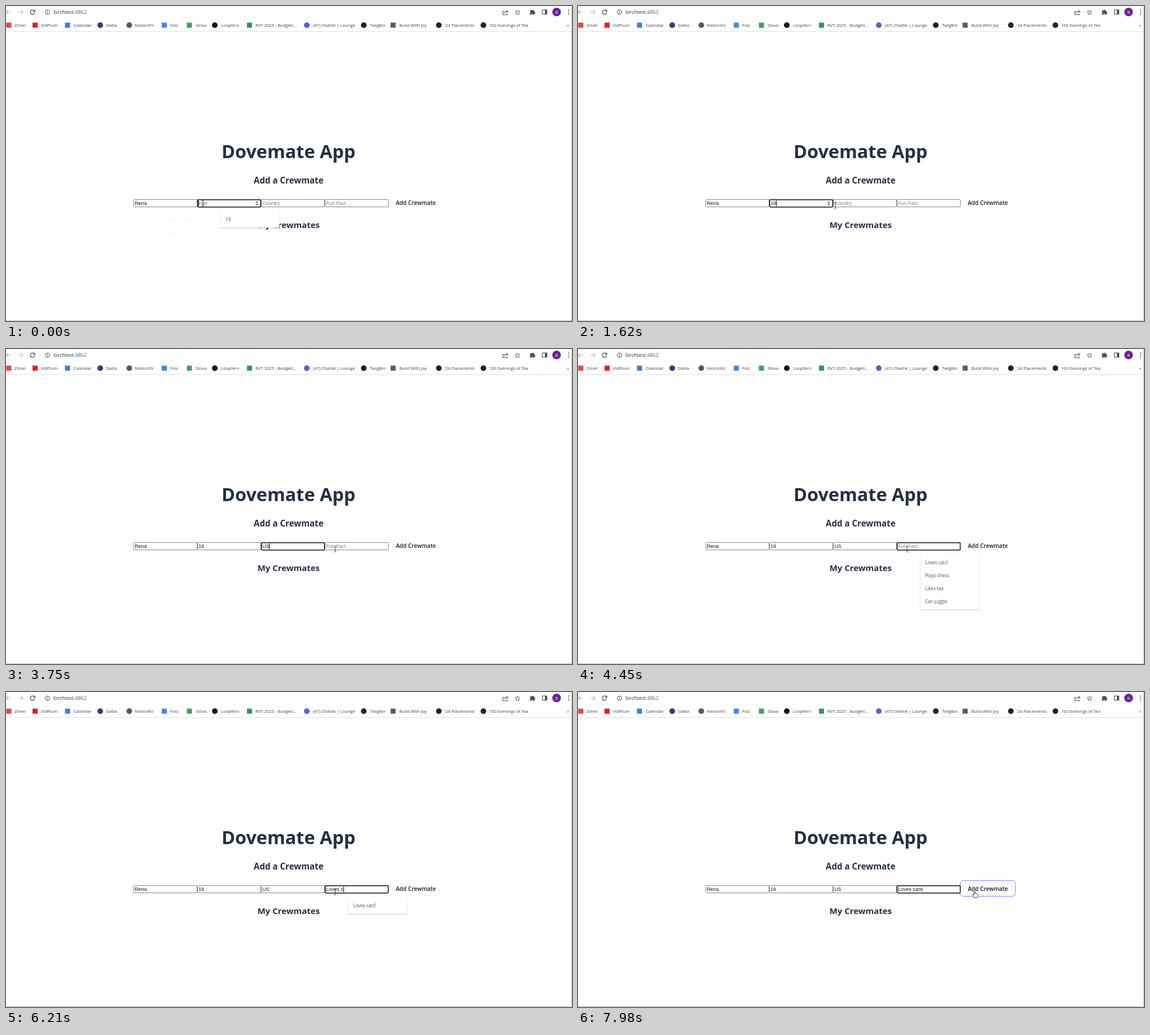
Animation of 1003 by 559 pixels, one loop 8000 ms. Source, as an HTML page:

```html
<!DOCTYPE html>
<html lang="en">
<head>
<meta charset="utf-8">
<title>Crew form</title>
<style>
html, body { margin: 0; width: 100%; height: 100%; overflow: hidden; background: #fff; }
svg { display: block; font-family: "Open Sans", "Noto Sans", sans-serif; }
text { white-space: pre; }
.bar { font-size: 7.6px; fill: #3f4246; }
.head { font-weight: 700; text-anchor: middle; fill: #242f42; }
.field { font: 8.89px "Liberation Sans", Arial, sans-serif; }
.line { fill: none; stroke: #4c4f53; stroke-width: 1.1; }
#menu rect { fill: #fff; filter: drop-shadow(0 1.2px .8px rgba(0, 0, 0, .22)); }
#menu text { font-size: 8.1px; fill: #505050; }
#button rect { fill: #fafafc; stroke: #8f8cff; filter: drop-shadow(0 1px 2px rgba(100, 108, 255, .12)); }
#ghost { font-size: 7.7px; fill: #f5f5f5; }
</style>
</head>
<body>
<svg id="stage" width="1003" height="559" viewBox="0 0 1003 559">
  <!-- address bar -->
  <g class="line">
    <path d="M9 11H0M4.5 7L.5 11l4 4M21 11h9M26 7l4 4-4 4" stroke="#b9bcc0"/>
    <path d="M50.3 8.3A4 4 0 1 0 51 12M51 6.5V9.6H47.8" stroke-width="1.3"/>
    <circle cx="73.5" cy="11" r="3.8"/>
    <path d="M73.5 10.5v2.7M73.5 8.6v1"/>
    <path d="M883 9.5H880.5V15.5H888.5V13.5M883 13C883.5 10.5 885 9.5 887 9.5M886.5 7.3L889.5 9.7L886.5 12"/>
    <path d="M906.5 7l1.25 2.8 3 .3-2.3 2 .7 3-2.65-1.6-2.65 1.6.7-3-2.3-2 3-.3z" stroke-width=".9"/>
    <rect x="950.5" y="7" width="8" height="7.5"/>
  </g>
  <g fill="#4c4f53">
    <path d="M928.5 8h2.5a1.5 1.5 0 0 1 3 0h2.5v2.5a1.5 1.5 0 0 1 0 3V15.5H934a1.5 1.5 0 0 0-3 0h-2.5v-2.5a1.5 1.5 0 0 0 0-2.7z"/>
    <rect x="955" y="7" width="3.5" height="7.5"/>
    <circle cx="997" cy="7.3" r="1"/><circle cx="997" cy="11" r="1"/><circle cx="997" cy="14.7" r="1"/>
  </g>
  <circle cx="975.7" cy="10.7" r="7.6" fill="#6b2398"/>
  <text x="975.7" y="13.6" font-size="7.5" text-anchor="middle" fill="#fff">R</text>
  <text x="84" y="14.3" font-size="8.85" fill="#303336">birchtest<tspan fill="#5c5f63">:4862</tspan></text>
  <g id="marks" class="bar"></g>
  <text class="bar" x="994" y="37" font-size="9">»</text>
  <path d="M0 45.5H1003" stroke="#dfe0e2"/>
  <path d="M1002.5 0V559M0 558.5H1003" stroke="#bdbdbd"/>

  <!-- page -->
  <text class="head" x="500.7" y="270" font-size="32.4">Dovemate App</text>
  <text class="head" x="500.8" y="315.3" font-size="15.1">Add a Crewmate</text>
  <text class="head" x="500.8" y="394" font-size="14.95">My Crewmates</text>
  <g id="button"><rect x="677.5" y="334.5" width="97.5" height="28" rx="5.5"/></g>
  <text x="726.3" y="353.2" font-size="10.05" font-weight="600" text-anchor="middle" fill="#1c1c1e">Add Crewmate</text>
  <g id="fields" class="field"></g>
  <path id="spin" d="M442 349.300l2.300-2.800 2.300 2.800zM442 351.300l2.300 2.800 2.300-2.800z" fill="#4a4a4a"/>
  <rect id="ring" y="343.7" width="111.8" height="13" rx="1.4" fill="none" stroke="#101010" stroke-width="1.5"/>
  <path id="caret" d="M0 345.3V355.3" stroke="#000"/>
  <g id="ghost">
    <text x="284" y="382">Rena Tovellin</text>
    <text x="284" y="405">Rena</text>
    <text x="284" y="428">Rena likes long walks and rainy mornings</text>
    <text x="284" y="451">Rena likes rainy mornings</text>
  </g>
  <g id="menu"></g>
  <path id="beam" class="line" d="M-2-5H-.7L0-4.5L.7-5H2M0-4.5V4.5M-2 5H-.7L0 4.5L.7 5H2" style="stroke:#333;stroke-width:.9"/>
  <path id="hand" d="M-1.8 1V-4.6C-1.8-6.2.3-6.2.3-4.6V-1.3C.8-2 2-1.8 2.2-1C2.9-1.6 3.9-1.2 4-.4C4.9-.8 5.5-.2 5.5.7C5.5 3 5 4 4.3 6H-1.3C-2 4.3-3.5 2.8-4.3 1.2C-4.6.1-3.3-.4-2.6.3Z" fill="#fff" stroke="#222" stroke-width=".9" stroke-linejoin="round"/>
</svg>
<script>
const $ = id => document.getElementById(id);
const set = (el, attrs) => { for (const k in attrs) el.setAttribute(k, attrs[k]); };
const show = (el, on) => set(el, { opacity: +on });

// Bookmarks: icon centre, shape, colour, label x, label
const marks = [
  [5, 's', '#e24a3b', 15, 'Zimel'], [51.5, 's', '#f01818', 62, 'VidPlum'],
  [109, 's', '#3b7de8', 120, 'Calendar'], [167, 'c', '#37358f', 177, 'Slatta'],
  [218.5, 'c', '#55585c', 228, 'NestorKV'], [280.5, 's', '#4386f3', 291, 'Folz'],
  [325, 's', '#36a55a', 336, 'Stova'], [370, 'c', '#151515', 381, 'Loopfern'],
  [431.5, 's', '#259c5b', 442, 'RVT 2025 - Budgeti...'], [533, 'c', '#5560dd', 544, '(47) Chattle | Lounge'],
  [634, 'c', '#202327', 645, 'TwigBin'], [686, 's', '#5b5b5b', 697, 'Build With Joy'],
  [767, 'c', '#202327', 777, "'24 Placements"], [846, 'c', '#202327', 856, '100 Evenings of Tea']
];
$('marks').innerHTML = marks.map(([x, shape, fill, tx, label]) =>
  (shape === 's'
    ? `<rect x="${x - 4.5}" y="29.500" width="9" height="9" fill="${fill}"/>`
    : `<circle cx="${x}" cy="34" r="5" fill="${fill}"/>`) +
  `<text x="${tx}" y="36.700">${label}</text>`).join('');

const left = i => 226 + i * 113;
const hints = ['Name', 'Age', 'Country', 'Fun Fact'];
$('fields').innerHTML = hints.map((_, i) =>
  `<rect x="${left(i) + .5}" y="343.500" width="112" height="13" rx=".8" fill="#fff" stroke="#858585"/>` +
  `<text x="${left(i) + 2.2}" y="353.100"></text>`).join('');
const labels = [...$('fields').querySelectorAll('text')];

// Each step changes some properties and keeps the rest
const steps = [
  [0, { focus: 1, age: '', country: '', fact: '', menu: ['19'], fade: 1, caret: 1, x: 349, y: 350, hover: 0, ghost: 1 }],
  [150, { ghost: 0 }],
  [430, { age: '1' }],
  [560, { age: '19' }],
  [690, { fade: .5 }],
  [820, { fade: 0 }],
  [1220, { x: 363, y: 351 }],
  [1360, { x: 398, y: 352 }],
  [1490, { x: 438, y: 353 }],
  [1620, { x: 456, y: 354 }],
  [1770, { focus: 2, menu: ['US', 'Canada', 'India'], fade: 1 }],
  [2320, { caret: 0 }],
  [2570, { country: 'U', menu: ['US'], caret: 1 }],
  [2720, { country: 'US', fade: .7 }],
  [2870, { fade: 0 }],
  [3300, { x: 468, y: 355 }],
  [3450, { x: 508 }],
  [3600, { x: 556 }],
  [3750, { x: 583.3 }],
  [3900, { focus: 3, menu: ['Loves cats!', 'Plays chess', 'Likes tea', 'Can juggle'], fade: .6 }],
  [4020, { fade: 1 }],
  [4450, { caret: 0 }],
  [4950, { caret: 1 }],
  [5240, { fact: 'L', menu: ['Loves cats!'] }],
  [5390, { fact: 'Lo' }],
  [5530, { fact: 'Lov' }],
  [5660, { fact: 'Love' }],
  [5940, { fact: 'Loves ' }],
  [6210, { fact: 'Loves c' }],
  [6490, { fact: 'Loves cat' }],
  [6640, { fact: 'Loves cats' }],
  [7040, { fact: 'Loves cats!', fade: .85, y: 356.5 }],
  [7160, { fade: .35 }],
  [7310, { fade: 0, x: 592 }],
  [7470, { x: 628, y: 357 }],
  [7620, { x: 684, y: 358, hover: .4, caret: 0 }],
  [7800, { x: 700, y: 359, hover: .9 }],
  [7980, { x: 703.5, hover: 1 }]
];

function draw(t) {
  const s = Object.assign({}, ...steps.filter(([at]) => at <= t).map(step => step[1]));
  const values = ['Rena', s.age, s.country, s.fact];
  values.forEach((value, i) => {
    labels[i].textContent = value || hints[i];
    set(labels[i], { fill: value ? '#151515' : '#808080' });
  });
  const x = left(s.focus);
  const end = values[s.focus] ? labels[s.focus].getComputedTextLength() : 0;
  set($('ring'), { x: x + .6 });
  set($('caret'), { transform: `translate(${Math.floor(x + 2.5 + end) + .5})` });
  show($('caret'), s.caret);
  show($('spin'), s.focus === 1);
  show($('ghost'), s.ghost);
  show($('menu'), s.fade);
  $('menu').innerHTML =
    `<rect x="${x + 42}" y="363.500" width="103.500" height="${7 + 23 * s.menu.length}" rx="2"/>` +
    s.menu.map((item, i) => `<text x="${x + 50}" y="${381.8 + 23 * i}">${item}</text>`).join('');
  show($('button'), s.hover);
  for (const id of ['beam', 'hand']) set($(id), { transform: `translate(${s.x} ${s.y})` });
  show($('beam'), !s.hover);
  show($('hand'), s.hover > 0);
}

const start = performance.now();
function tick() {
  draw((performance.now() - start) % 8000);
  requestAnimationFrame(tick);
}
tick();
</script>
</body>
</html>
```
